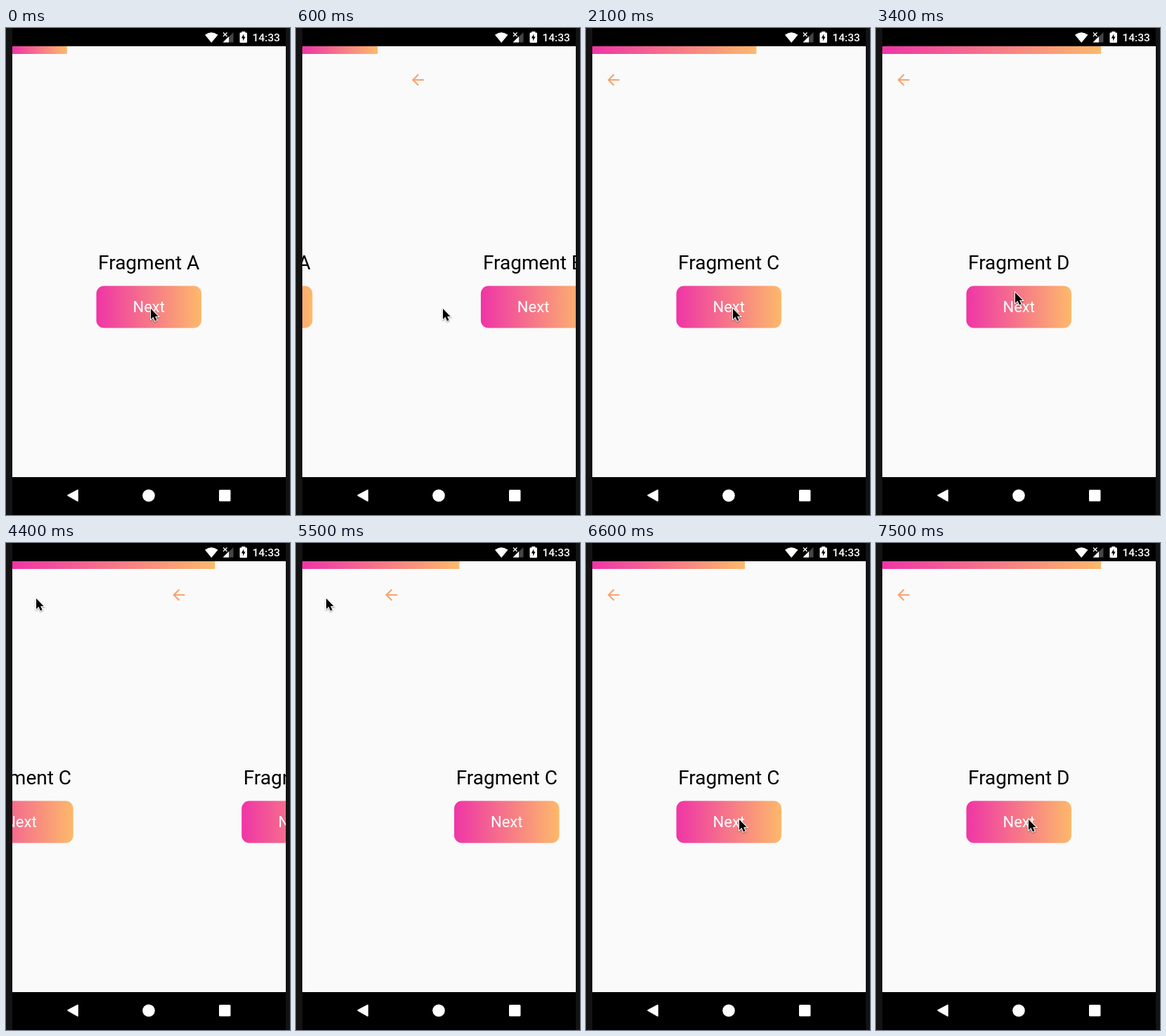
Animation of 404 by 694 pixels, one loop 8 s. Source, as an HTML page with a canvas:

```html
<!DOCTYPE html>
<html lang="en">
<head>
<meta charset="utf-8">
<title>Fragment navigation</title>
<style>
  html, body { margin: 0; width: 100%; height: 100%; overflow: hidden; background: #000; }
  canvas { display: block; }
</style>
</head>
<body>
<canvas id="stage"></canvas>
<script>
const W = 404, H = 694, LOOP = 8000, STEP = 100;
const SCREEN = { x: 9, y: 26, w: 389, h: 614 };
const PINK = '#ef35a6', ORANGE = '#fdb96b';
const SLIDE_MS = 250, BAR_MS = 356;

// Page changes: start time, page before, page after
const moves = [
  [450, 0, 1], [1430, 1, 2], [2417, 2, 3], [4270, 3, 2],
  [5417, 2, 1], [6352, 1, 2], [7070, 2, 3]
];

// Pointer path: time, x, y
const pointerKeys = [
  [0, 206, 400], [200, 209, 400], [3300, 209, 400], [3400, 198, 377],
  [4100, 43, 79], [5500, 43, 79], [6200, 218, 394], [6900, 218, 394], [7100, 217, 394]
];

const BACK = new Path2D('M20 11H7.83l5.59-5.59L12 4l-8 8 8 8 1.41-1.41L7.83 13H20v-2z');
const POINTER = new Path2D('M0 0V15L3.5 11.8 6 17.4 8.6 16.3 6.1 10.9H10.7Z');
const WIFI = new Path2D('M283 9.8Q292 2.6 301.5 9.8L292.2 21Z');
const BOLT = new Path2D('M338.3 8.5L334.8 14.4H337.1V18.6L340.6 12.6H338.3Z');

const canvas = document.getElementById('stage');
const ctx = canvas.getContext('2d');
const ratio = window.devicePixelRatio || 1;
canvas.width = W * ratio;
canvas.height = H * ratio;
canvas.style.width = W + 'px';
canvas.style.height = H + 'px';
ctx.scale(ratio, ratio);

const clamp = v => Math.min(1, Math.max(0, v));
const ease = v => 0.5 - 0.5 * Math.cos(Math.PI * clamp(v));
const mix = (a, b, k) => a + (b - a) * k;

function gradient(x0, x1) {
  const g = ctx.createLinearGradient(x0, 0, x1, 0);
  g.addColorStop(0, PINK);
  g.addColorStop(1, ORANGE);
  return g;
}

function box(x, y, w, h, r, fill) {
  ctx.fillStyle = fill;
  ctx.beginPath();
  ctx.roundRect(x, y, w, h, r);
  ctx.fill();
}

function poly(points, fill) {
  ctx.fillStyle = fill;
  ctx.beginPath();
  points.forEach(([x, y]) => ctx.lineTo(x, y));
  ctx.closePath();
  ctx.fill();
}

function text(str, x, y, font, fill, align = 'center') {
  ctx.font = font + ' Roboto, sans-serif';
  ctx.textAlign = align;
  ctx.fillStyle = fill;
  ctx.fillText(str, x, y);
}

function drawStatus() {
  ctx.fillStyle = '#fff';
  ctx.fill(WIFI);
  poly([[309, 20.5], [323.5, 20.5], [323.5, 6]], '#454545');
  poly([[308.5, 20.5], [317, 20.5], [317, 12]], '#fff');
  ctx.strokeStyle = '#fff';
  ctx.lineWidth = 1.3;
  ctx.beginPath();
  ctx.moveTo(309, 6.5); ctx.lineTo(314.5, 12);
  ctx.moveTo(314.5, 6.5); ctx.lineTo(309, 12);
  ctx.stroke();
  box(332.5, 6.5, 10.5, 14.5, 1.2, '#fff');
  box(335.3, 5, 5, 2.5, 0, '#fff');
  ctx.fillStyle = '#000';
  ctx.fill(BOLT);
  text('14:33', 350.5, 19, '500 15.5px', '#fff', 'left');
}

function drawNav() {
  const tri = [[88, 666], [102, 658.5], [102, 674]];
  poly(tri, '#fff');
  ctx.strokeStyle = '#fff';
  ctx.lineWidth = 1.6;
  ctx.lineJoin = 'round';
  ctx.stroke();
  box(194.2, 657.4, 17.6, 17.6, 8.8, '#fff');
  box(303, 658, 16.5, 16.5, 1.5, '#fff');
}

function drawPage(page, dx) {
  ctx.save();
  ctx.translate(dx, 0);
  text('Fragment ' + 'ABCD'[page], 203.2, 343.5, '28px', '#000');
  box(128.5, 367.5, 149.5, 60, 11, gradient(128.5, 278));
  text('Next', 203.2, 405, '22px', '#fff');
  if (page > 0) {
    ctx.translate(26.2, 61.2);
    ctx.scale(1.07, 1.07);
    ctx.fillStyle = '#f9a36f';
    ctx.fill(BACK);
  }
  ctx.restore();
}

function drawPointer(t) {
  let i = pointerKeys.length - 1;
  while (pointerKeys[i][0] > t) i--;
  const a = pointerKeys[i], b = pointerKeys[i + 1] || a;
  const k = ease((t - a[0]) / (b[0] - a[0] || 1));
  ctx.save();
  ctx.translate(mix(a[1], b[1], k), mix(a[2], b[2], k));
  ctx.lineJoin = 'miter';
  ctx.lineWidth = 2;
  ctx.strokeStyle = '#fff';
  ctx.shadowColor = 'rgba(0,0,0,0.4)';
  ctx.shadowBlur = 2 * ratio;
  ctx.shadowOffsetY = ratio;
  ctx.stroke(POINTER);
  ctx.shadowColor = 'transparent';
  ctx.fillStyle = '#000';
  ctx.fill(POINTER);
  ctx.restore();
}

function draw(t) {
  const [start, from, to] = moves.filter(m => m[0] <= t).pop() || [0, 0, 0];
  const slide = ease((t - start) / SLIDE_MS);
  const level = mix(from, to, ease((t - start) / BAR_MS));
  const dir = Math.sign(to - from);

  ctx.fillStyle = '#131313';
  ctx.fillRect(0, 0, W, H);
  ctx.fillStyle = '#000';
  ctx.fillRect(SCREEN.x, 0, SCREEN.w, H);
  drawStatus();
  drawNav();

  ctx.save();
  ctx.beginPath();
  ctx.rect(SCREEN.x, SCREEN.y, SCREEN.w, SCREEN.h);
  ctx.clip();
  ctx.fillStyle = '#fafafa';
  ctx.fillRect(SCREEN.x, SCREEN.y, SCREEN.w, SCREEN.h);
  if (dir && slide < 1) drawPage(from, -dir * slide * SCREEN.w);
  drawPage(to, dir * (1 - slide) * SCREEN.w);
  const barW = SCREEN.w * (level + 1) / 5;
  box(SCREEN.x, SCREEN.y, barW, 11, 0, gradient(SCREEN.x, SCREEN.x + barW));
  ctx.restore();

  drawPointer(t);
}

const origin = performance.now();
function tick() {
  const t = (performance.now() - origin) % LOOP;
  draw(Math.floor(t / STEP) * STEP);
  requestAnimationFrame(tick);
}
tick();
</script>
</body>
</html>
```
